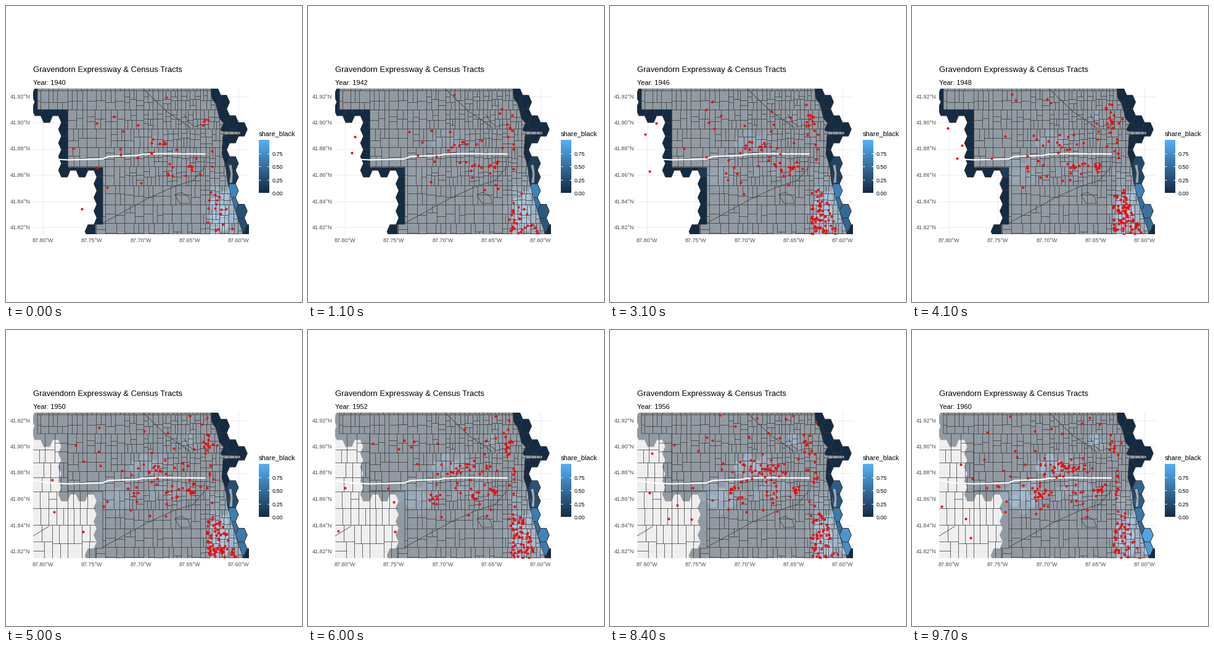
A matplotlib script that plays this animation: 480 by 480 pixels, repeating every 10000 ms.

```python
import numpy as np
import matplotlib.pyplot as plt
from matplotlib.animation import FuncAnimation
from matplotlib.collections import LineCollection, PolyCollection
from matplotlib.colors import LinearSegmentedColormap
from matplotlib.patches import Polygon, Rectangle
from matplotlib.path import Path

plt.rcParams["font.family"] = "Liberation Sans"
LEFT, TOP, RIGHT, BOTTOM = 44, 134, 394, 370
BLUES = LinearSegmentedColormap.from_list("blues", ["#132B43", "#56B1F7"])
INK = "#333333"

# Frames at which each following year has fully arrived
SETTLED = [*range(6, 47, 5), *range(50, 86, 5), *range(89, 98, 4)]

# ---------------------------------------------------------------- geography
SHORE = [(332, 134), (334, 150), (341, 160), (346, 182), (353, 190), (348, 200),
         (350, 203), (380, 204), (380, 208), (352, 209), (351, 225), (350, 240),
         (354, 252), (357, 265), (359, 285), (361, 292), (366, 312), (371, 328),
         (376, 345), (385, 370)]
CITY_WEST = [(145, 370), (145, 354), (157, 354), (157, 262), (100, 262),
             (100, 168), (51, 168), (51, 134)]
ISLAND = [(361, 258), (366, 257), (368, 272), (367, 287), (362, 287), (364, 272)]
ROAD = [(44, 244), (70, 248), (100, 249.5), (157, 248), (166, 244), (212, 242.5),
        (222, 240.3), (250, 239.5), (323, 240)]

# Columns: x, y, x spread, y spread, share in 1940 and 1960
BLOBS = [
    (349, 338, 19, 38, .9, .85),
    (384, 342, 9, 19, .3, .95),
    (368, 308, 8, 16, .7, .6),
    (368, 264, 8, 18, .1, .45),
    (340, 270, 14, 12, .1, .4),
    (232, 220, 28, 12, .15, .7),
    (180, 270, 26, 18, .02, .65),
    (265, 263, 28, 12, .1, .45),
    (300, 180, 11, 12, .03, .6),
]


def hexagons():
    """Flat-topped cells that touch the city or the water just off it."""
    outline = [(x + 6, y) for x, y in SHORE] + CITY_WEST
    area = Path(outline + outline[:1])
    pitch, height = 14.35, 22.1
    half = pitch / 1.5
    shape = np.array([(-half, 0), (-half / 2, -height / 2), (half / 2, -height / 2),
                      (half, 0), (half / 2, height / 2), (-half / 2, height / 2),
                      (-half, 0)])
    cells, centres = [], []
    for k in range(-4, 22):
        for n in range(-4, 9):
            c = np.array([94.7 + pitch * k, 200 + height * (n - k % 2 / 2)])
            if area.intersects_path(Path(shape + c), filled=True):
                cells.append(shape + c)
                centres.append(c)
    return cells, np.array(centres)


def share(centres, year):
    """Flat-topped bumps whose levels drift over the two decades."""
    total = np.zeros(len(centres))
    for x, y, sx, sy, first, last in BLOBS:
        level = first + (last - first) * (year - 1940) / 20
        dist = ((centres[:, 0] - x) / sx) ** 2 + ((centres[:, 1] - y) / sy) ** 2
        total = np.maximum(total, level * np.exp(-dist ** 2 / 2))
    return total


def split(box, limit, rng, out):
    """Cut a block into tracts, collecting the dividing lines."""
    x0, y0, x1, y1 = box
    w, h = x1 - x0, y1 - y0
    if w * h < limit * rng.uniform(.7, 1.6):
        return
    cut = .5 + rng.choice([0, 0, .06, -.06, .12])
    if w > h * rng.uniform(.45, .9):
        x = x0 + w * cut
        out.append([(x, y0), (x, y1)])
        parts = (x0, y0, x, y1), (x, y0, x1, y1)
    else:
        y = y0 + h * cut
        out.append([(x0, y), (x1, y)])
        parts = (x0, y0, x1, y), (x0, y, x1, y1)
    for part in parts:
        split(part, limit, rng, out)


def city_lines():
    """Mile squares cut into tracts, finer towards the east."""
    rng = np.random.default_rng(12)
    mile = 30.7
    out = []
    for i in range(-2, 10):
        for j in range(-1, 8):
            x, y = 100 + mile * i, 137.3 + mile * j
            out.append([(x, y + mile), (x, y), (x + mile, y)])
            limit = np.interp(x, [130, 230], [240, 105])
            if y > 285 and x < 290:
                limit = 260
            split((x, y, x + mile, y + mile), limit, rng, out)
    out += [
        [(222, 134), (262, 172), (300, 198)],
        [(157, 352), (190, 334), (232, 311), (272, 293), (303, 283), (322, 262)],
        [(274, 306), (284, 302), (296, 309), (299, 320), (282, 320), (274, 306)],
        [(288, 175), (294, 186), (306, 196), (317, 192)],
    ]
    return out


def suburb_lines():
    rng = np.random.default_rng(5)
    out = []
    for box in [(44, 168, 100, 262), (44, 262, 100, 370), (100, 262, 145, 370)]:
        split(box, 420, rng, out)
    out += [[(44, 334), (70, 318)], [(44, 262), (100, 262), (100, 370)]]
    return out


# ---------------------------------------------------------------- red points
# Columns: x, y, x spread, y spread, number of points in 1940, 1948 and 1960
CLUSTERS = [
    (246, 224, 19, 6, (8, 10, 36)),
    (206, 264, 8, 10, (0, 3, 20)),
    (265, 262, 12, 9, (5, 11, 7)),
    (299, 262, 5, 4, (5, 9, 9)),
    (324, 188, 6, 10, (4, 14, 9)),
    (333, 235, 2, 18, (2, 4, 6)),
]


def points(year):
    rng = np.random.default_rng(year)

    def amount(counts):
        return round(np.interp(year, [1940, 1948, 1960], counts))

    n = amount((16, 30, 34))
    scattered = np.column_stack([335 - 190 * rng.random(n) ** 1.2,
                                 rng.uniform(138, 305, n)])
    strays = rng.uniform((48, 160), (145, 345), (amount((2, 4, 10)), 2))
    groups = [scattered, strays]
    for x, y, sx, sy, counts in CLUSTERS:
        groups.append(rng.normal((x, y), (sx, sy), (amount(counts), 2)))

    # Dense belt that widens to the south
    n = amount((16, 80, 42))
    y = 296 + 74 * rng.random(n) ** .7
    x = 326 + (20 + .4 * (y - 300)) * rng.random(n)
    groups.append(np.column_stack([x, y]))
    return np.vstack(groups)


# ---------------------------------------------------------------- stage
fig = plt.figure(figsize=(480 / 72, 480 / 72), dpi=72, facecolor="white")
ax = fig.add_axes([0, 0, 1, 1])
ax.axis("off")
ax.imshow(np.linspace(1, 0, 256)[:, None], cmap=BLUES, aspect="auto",
          extent=(410, 427, 303, 217.5))
ax.set(xlim=(0, 480), ylim=(480, 0))
panel = Rectangle((LEFT, TOP), RIGHT - LEFT, BOTTOM - TOP, transform=ax.transData)


def put(artist, clip=panel):
    artist.set_clip_path(clip)
    return artist


for i in range(5):
    x = 60 + 79.3 * i
    ax.plot([x, x], [TOP, BOTTOM], color="#EBEBEB", lw=1, zorder=1)
    ax.text(x, 383, f"{87.8 - .05 * i:.2f}°W", size=9, color="#4D4D4D", ha="center")
for i in range(6):
    y = 146.5 + 42.5 * i
    ax.plot([LEFT, RIGHT], [y, y], color="#EBEBEB", lw=1, zorder=1)
    ax.text(39, y + 3, f"{41.92 - .02 * i:.2f}°N", size=9, color="#4D4D4D", ha="right")

ax.text(44, 107, "Gravendorn Expressway & Census Tracts", size=13)
label = ax.text(44, 128, "", size=11)
ax.text(410, 210, "share_black", size=11)
for i in range(4):
    y = 303 - 21.4 * i
    ax.text(432, y + 4, f"{i / 4:.2f}", size=9)
    for x in (410, 423.6):
        ax.plot([x, x + 3.4], [y, y], color="white", lw=1, solid_capstyle="butt")

cells, centres = hexagons()
hexes = put(ax.add_collection(PolyCollection(cells, edgecolors=INK, linewidths=1,
                                             zorder=2)))
tint = (229 / 255,) * 3 + (.6,)
city = put(ax.add_patch(Polygon(SHORE + CITY_WEST, fc=tint, ec=INK, lw=.7, zorder=3)))
region = put(ax.add_patch(Polygon(SHORE + [(44, 370), (44, 134)], fc=tint, ec="none",
                                  zorder=3)))
put(ax.add_patch(Polygon(ISLAND, fc=tint, ec=INK, lw=.6, zorder=3)))
put(ax.add_collection(LineCollection(city_lines(), colors=INK, linewidths=.7, zorder=4)),
    city)
suburbs = put(ax.add_collection(LineCollection(suburb_lines() + [CITY_WEST + SHORE],
                                               colors=INK, linewidths=.7, zorder=4)))
put(ax.plot(*zip(*ROAD), color="white", lw=2.1, zorder=5)[0])
dots = put(ax.scatter([], [], s=17, color="red", linewidths=0, zorder=6))

POINTS = [points(1940 + i) for i in range(21)]


def draw(frame):
    index = sum(s <= frame for s in SETTLED)
    # One in-between step, except where the decade's map switches at once
    moving = frame + 1 in SETTLED and frame + 1 != 50
    year = 1940 + index
    label.set_text(f"Year: {year}")
    dots.set_offsets(POINTS[index + moving])
    hexes.set_facecolor(BLUES(share(centres, year + .5 * moving)))
    late = year >= 1950
    city.set_visible(not late)
    region.set_visible(late)
    suburbs.set_visible(late)
    return label, dots, hexes, city, region, suburbs


anim = FuncAnimation(fig, draw, frames=100, interval=100, repeat=True, repeat_delay=0)
plt.show()
```
